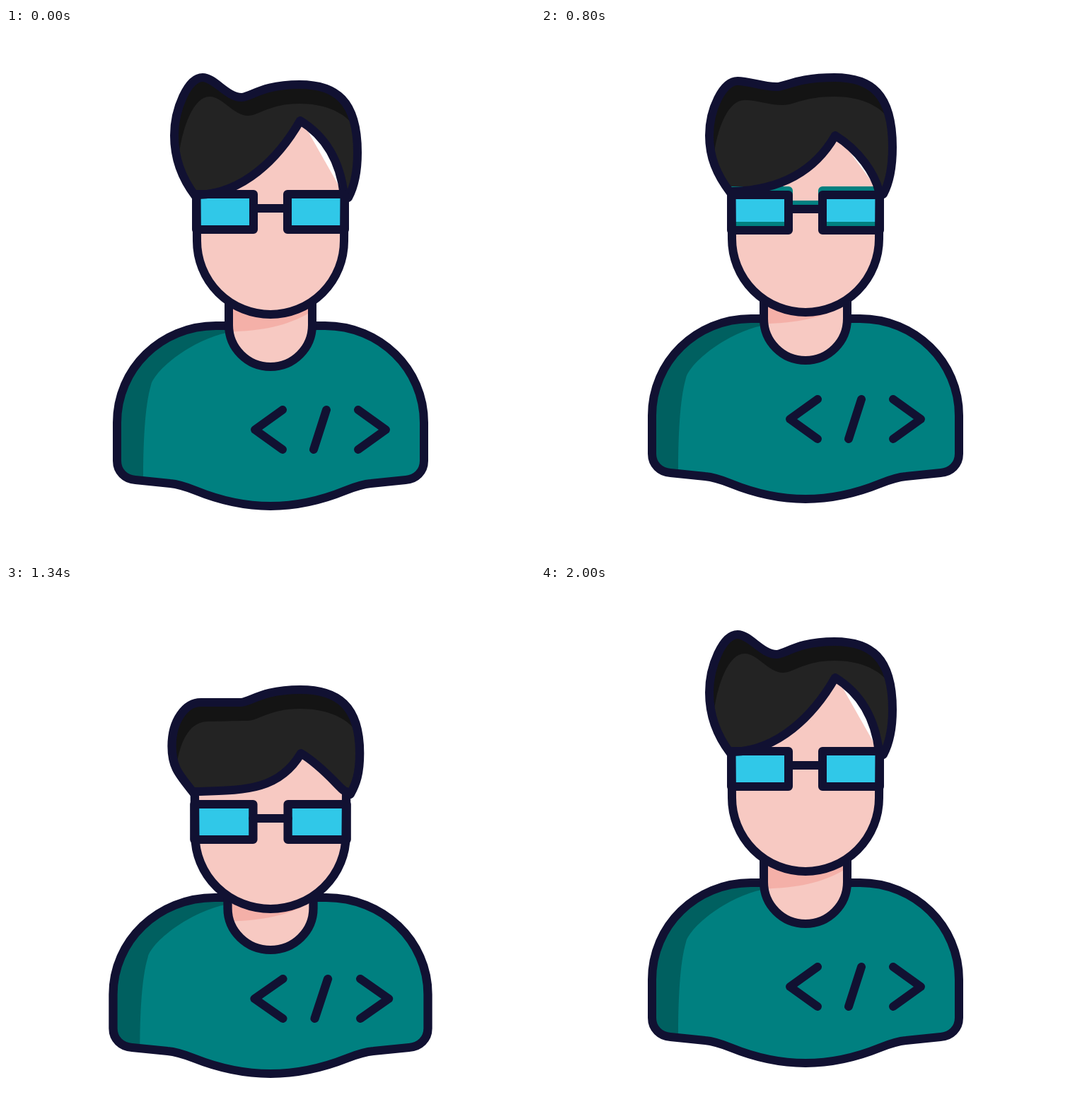
Write an HTML page with a canvas that moves like this. It is 748 px wide and 748 px high and loops after 2.03 s.

```html
<!DOCTYPE html>
<html lang="en">
<head>
<meta charset="utf-8">
<title>Jumping coder</title>
<style>
  html, body { margin: 0; width: 100%; height: 100%; overflow: hidden; background: #fff; }
  canvas { display: block; }
</style>
</head>
<body>
<canvas id="stage" width="748" height="748"></canvas>
<script>
const ctx = document.getElementById('stage').getContext('2d');
const LOOP = 2030, START = 530, STEP = 30, MID = 374;
const INK = '#111132', TEAL = '#008080', SKIN = '#f7c9c2';

// Resting heights of hem, shoulder, code, neck, chin, glasses, hair base, crest, valley, top, fringe tip
const rest = [676, 421, 568, 479, 405, 235, 238, 70, 98, 80, 131];

// A pose is: time, x scale, glasses shade offset, then one vertical offset per resting height
const pose = (time, scale, shade, ...offsets) => [time, scale, shade, ...offsets];
const squash = (time, scale, low, press) =>
  pose(time, scale, 0, ...rest.map(y => low + press * (rest[0] - y)));

const poses = [
  squash(500, 1, 0, 0),
  squash(530, 1.005, 5, 0.0075),
  squash(600, 1.018, 18, 0.027),
  pose(800, 1, -6, -10, -10, -15, -9, -3, 1, -5, 5, -15, -10, 21),
  pose(940, 1, -6, -22, -22, -28, -34, -38, -44, -40, -57, -62, -60, -28),
  pose(1040, 1, -6, -14, -14, -20, -27, -30, -37, -33, -46, -56, -46, -25),
  pose(1340, 1.0255, 0, 15, 21, 17, 37, 53, 75, 56, 96, 68, 68, 107),
  pose(1580, 1, 0, -4.5, -4.5, -5, -4.5, -4.5, -5, -5, -11, -9, -9.5, -3),
  squash(1750, 1, 4, 0),
  squash(2000, 1, 0, 0)
];

const slope = (i, k) =>
  (poses[i + 1][k] - poses[i][k]) / (poses[i + 1][0] - poses[i][0]);

// Zero at turning points, harmonic mean elsewhere
function tangent(i, k) {
  if (i === 0 || i === poses.length - 1) return 0;
  const a = slope(i - 1, k), b = slope(i, k);
  return a * b <= 0 ? 0 : 2 * a * b / (a + b);
}

function poseAt(time) {
  const t = Math.min(Math.max(time, 500), 2000);
  let i = 0;
  while (i < poses.length - 2 && t >= poses[i + 1][0]) i++;
  const span = poses[i + 1][0] - poses[i][0], u = (t - poses[i][0]) / span;
  return poses[i].slice(1).map((p, j) => {
    const k = j + 1, q = poses[i + 1][k];
    return p + (q - p) * u * u * (3 - 2 * u)
      + span * u * (1 - u) * (tangent(i, k) * (1 - u) - tangent(i + 1, k) * u);
  });
}

function fill(path, color) {
  ctx.fillStyle = color;
  ctx.fill(path);
}

function stroke(path, color = INK) {
  ctx.strokeStyle = color;
  ctx.stroke(path);
}

// Fills a path in a shadow colour, then its lit part
function shaded(path, dark, lit, color) {
  fill(path, dark);
  ctx.save();
  ctx.clip(path);
  fill(lit, color);
  ctx.restore();
}

function drawBody(hem, shoulder, code) {
  const b = y => y + hem, s = y => y + shoulder, c = y => y + code;
  const body = new Path2D(`M374 ${s(421)} H297 C219 ${s(421)} 157 ${s(482)} 157 ${s(558)}
    V${b(612)} C157 ${b(627)} 168 ${b(638)} 183 ${b(639)}
    L232 ${b(644)} C245 ${b(645)} 258 ${b(650)} 268 ${b(654)}
    C300 ${b(667)} 337 ${b(676)} 374 ${b(676)}`);
  body.addPath(new Path2D(body), new DOMMatrix([-1, 0, 0, 1, 2 * MID, 0]));
  const lit = new Path2D(`M194 ${b(640)} C194 ${s(590)} 196 ${s(535)} 205 ${s(505)}
    C212 ${s(480)} 270 ${s(437)} 318 ${s(430)} L600 ${s(400)} V${b(700)} H194 Z`);
  shaded(body, '#006060', lit, TEAL);
  stroke(body);
  stroke(new Path2D(`M391 ${c(540)} l-39 28 l39 28 M453 ${c(540)} l-18 56
    M498 ${c(540)} l39 28 l-39 28`));
}

function drawNeck(neck, chin) {
  const y = 420 + neck, edge = 430 + neck * 1.25;
  const shape = new Path2D(`M315 ${chin + 370} V${y} A59 59 0 0 0 433 ${y} V${chin + 370}`);
  const lit = new Path2D(`M310 ${edge} C360 ${edge - 2} 395 ${edge - 7} 430 ${edge - 28}
    H440 V${y + 70} H310 Z`);
  shaded(shape, '#f4b0a8', lit, SKIN);
  stroke(shape);
}

function drawHead(shade, chin, glasses, base, crest, valley, top, tip) {
  const h = y => y + base, c = y => y + crest, v = y => y + valley,
    t = y => y + top, f = y => y + tip;
  const left = 152 + (base + crest) / 2, right = 176 + (base + top) / 2;

  const jaw = new Path2D(`M269.5 ${h(236)} L270 ${301 + chin}
    A104 104 0 0 0 478 ${301 + chin} L478.5 ${h(236)}`);
  const brow = new Path2D(`M269.5 ${h(237)} L415 ${f(125)} L478.5 ${h(237)} Z`);
  const hair = new Path2D(`M268 ${h(238)} C248 ${h(212)} 238 ${left + 30} 238 ${left}
    C238 ${left - 37} 257 ${c(70)} 278 ${c(70)}
    C295 ${c(70)} 312 ${v(98)} 333 ${v(98)}
    C346 ${v(98)} 362 ${t(80)} 415 ${t(80)}
    C466 ${t(80)} 497 ${t(102)} 497 ${right}
    C497 ${right + 29} 492 ${h(225)} 484 ${h(240)} L478 ${h(236)}
    C472 ${f(185)} 450 ${f(152)} 416 ${f(131)}
    C385 ${f(185)} 335 ${h(234)} 272 ${h(236)} Z`);
  const lit = new Path2D(`M243 ${left + 38} C249 ${left - 15} 266 ${c(97)} 288 ${c(97)}
    C306 ${c(97)} 322 ${v(124)} 342 ${v(124)}
    C358 ${v(124)} 372 ${t(107)} 415 ${t(107)}
    C448 ${t(107)} 475 ${t(118)} 488 ${t(134)}
    L510 ${t(150)} V${h(300)} H225 V${left + 38} Z`);

  fill(jaw, SKIN);
  fill(brow, SKIN);
  shaded(hair, '#141414', lit, '#232323');

  const frame = y => new Path2D(`M269 ${y} h81 v50 h-81 Z M398 ${y} h81 v50 h-81 Z`);
  const bridge = y => new Path2D(`M350 ${y + 20} h48`);
  const y = 235 + glasses;
  fill(frame(y), '#30c8e8');
  if (shade < -0.2) {
    stroke(frame(y + shade), TEAL);
    stroke(bridge(y + shade), TEAL);
  }
  for (const line of [jaw, hair, frame(y), bridge(y)]) stroke(line);
}

function draw() {
  const now = performance.now() % LOOP;
  const time = now < START ? 0 : START + Math.floor((now - START) / STEP) * STEP;
  const [scale, shade, hem, shoulder, code, neck, chin, ...head] = poseAt(time);

  ctx.setTransform(1, 0, 0, 1, 0, 0);
  ctx.clearRect(0, 0, 748, 748);
  ctx.setTransform(scale, 0, 0, 1, MID * (1 - scale), 0);
  ctx.lineWidth = 12;
  ctx.lineCap = ctx.lineJoin = 'round';
  drawBody(hem, shoulder, code);
  drawNeck(neck, chin);
  drawHead(shade, chin, ...head);
  requestAnimationFrame(draw);
}
draw();
</script>
</body>
</html>
```
